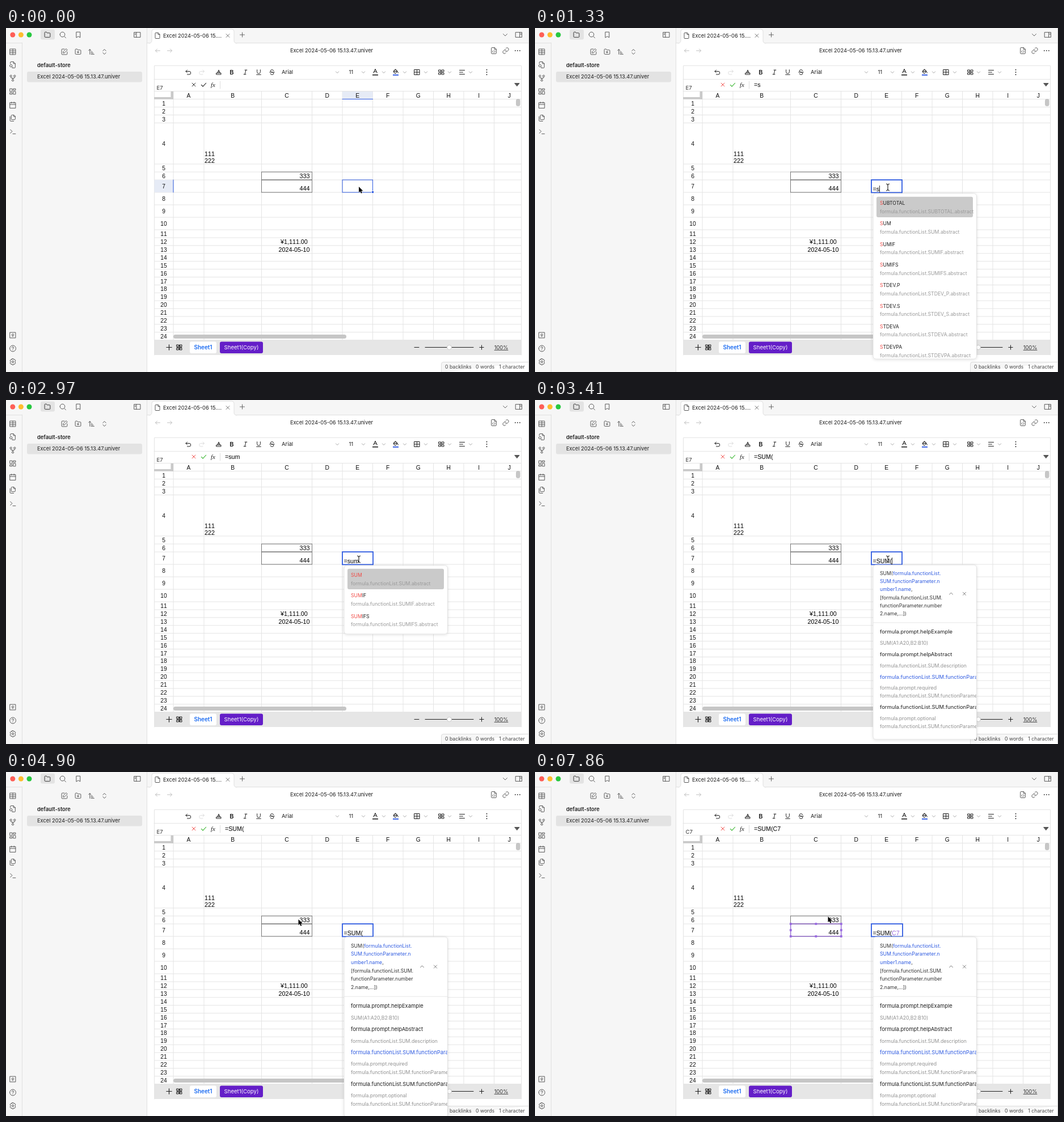
These frames come from a looping animation (922x607 px, 8000 ms). An HTML page:

```html
<!DOCTYPE html>
<html lang="en">
<head>
<meta charset="utf-8">
<title>Spreadsheet formula entry</title>
<style>
html, body { margin: 0; width: 100%; height: 100%; overflow: hidden; background: #fff; }
svg { display: block; }
text { font-family: Inter, "Open Sans", sans-serif; white-space: pre; }
.cell { font-family: "Liberation Sans", Arial, sans-serif; font-kerning: none; }
.icon { fill: none; stroke-linecap: round; stroke-linejoin: round; }
</style>
</head>
<body>
<svg id="stage" width="922" height="607" viewBox="0 0 922 607">
  <defs>
    <clipPath id="panelClip"><rect x="596" y="290" width="182" height="330"/></clipPath>
    <clipPath id="gridClip"><rect x="261" y="111" width="647" height="439"/></clipPath>
    <filter id="soft" x="-10%" y="-10%" width="120%" height="120%">
      <feDropShadow dx="0" dy="1" stdDeviation="2.5" flood-opacity=".13"/>
    </filter>
  </defs>
  <g id="base"></g>
  <g id="live"></g>
</svg>
<script>
const LOOP = 8000, BLUE = '#2f5be0', PURPLE = '#9a6be0', INK = '#1f1f1f', LINE = '#e4e4e4';
const $ = id => document.getElementById(id);

// ---- drawing helpers; y of a text is the middle of its capitals
const text = (x, y, s, size = 9.3, fill = INK, more = '') =>
  `<text x="${x}" y="${y + size * .36}" font-size="${size}" fill="${fill}" ${more}>${s}</text>`;
const cell = (x, y, s, size = 10.75, fill = '#000', more = '') =>
  text(x, y, s, size, fill, 'class="cell" ' + more);
const rect = (x, y, w, h, fill, more = '') =>
  `<rect x="${x}" y="${y}" width="${w}" height="${h}" fill="${fill}" ${more}/>`;
const frame = (x, y, w, h, color, width = 1, fill = 'none') =>
  rect(x, y, w, h, fill, `stroke="${color}" stroke-width="${width}"`);
const path = (d, color = INK, width = 1, more = '') =>
  `<path class="icon" d="${d}" stroke="${color}" stroke-width="${width}" ${more}/>`;
// icon on a 24 unit grid, centred on x, y
const icon = (x, y, d, color = '#555', size = 13, width = 1.8) =>
  `<g transform="translate(${x - size / 2} ${y - size / 2}) scale(${size / 24})">${path(d, color, width)}</g>`;
const MID = 'text-anchor="middle"', END = 'text-anchor="end"';

const X = 'M5 5L19 19M19 5L5 19', PLUS = 'M12 4V20M4 12H20', DOWN = 'M5 9L12 16L19 9';
const UNDO = 'M8 4L3 9L8 14M3 9H15A5.5 5.5 0 0 1 15 20H8';
const FILE = 'M14 2H6A2 2 0 0 0 4 4V20A2 2 0 0 0 6 22H18A2 2 0 0 0 20 20V8ZM14 2V8H20';
const FOLDER = 'M3 5A2 2 0 0 1 5 3H9L11 6H19A2 2 0 0 1 21 8V18A2 2 0 0 1 19 20H5A2 2 0 0 1 3 18Z';
const box = (x, y, w, h) => `M${x} ${y}h${w}v${h}h${-w}Z`;
const ring = (x, y, r) => `M${x - r} ${y}a${r} ${r} 0 1 0 ${2 * r} 0a${r} ${r} 0 1 0 ${-2 * r} 0`;

// ---- sheet geometry
const cols = [295, 349, 450.5, 539.5, 593, 646.5, 700, 753.5, 807, 860.5, 914];
const rows = [125.5, 139.5, 153.5, 167.5, 240, 254, 268, 290, 312, 334, 356, 370];
while (rows.length < 25) rows.push(rows[rows.length - 1] + 13.9);

function chrome() {
  let s = rect(0, 0, 922, 607, '#fff') + rect(0, 0, 248, 607, '#f6f6f6') + rect(248, 0, 674, 26, '#f6f6f6');
  s += path('M28.5 26V607M0 26.5H28M248.5 0V607M248 26.5H922', '#e0e0e0');
  s += path('M252 27Q257 27 257 22V6Q257 2 261 2H398Q402 2 402 6V22Q402 27 407 27', '#e0e0e0', 1, 'style="fill:#fff"');
  s += path('M921.5 0V607', '#d4d4d4');
  ['#fe5f57', '#febc2e', '#28c840'].forEach((c, i) =>
    s += `<circle cx="${11.8 + i * 14.6}" cy="12" r="4.5" fill="${c}"/>`);
  s += rect(61, 2.5, 25, 18, '#e3e3e3', 'rx="3"');
  s += icon(73, 12, FOLDER, '#333') + icon(100, 12, ring(11, 11, 8) + 'M17 17L22 22');
  s += icon(127.5, 12, 'M6 3H18V21L12 17L6 21Z');
  s += icon(231.5, 12, box(2, 4, 20, 16) + 'M9 4V20M4.5 8H6M4.5 11H6') + icon(904, 12, box(2, 4, 20, 16) + 'M15 4V20M18 8H19.5M18 11H19.5');
  s += icon(267, 13.5, FILE, '#444', 12) + text(277, 13.5, 'Excel 2024-05-06 15....');
  s += icon(391, 13.5, X, '#444', 10) + icon(416.5, 12, PLUS, '#555', 12) + icon(880, 12, DOWN, '#555', 12);

  // left strip
  const strip = [
    [42, box(3, 3, 18, 18) + 'M3 9H21M3 15H21M12 3V21'],
    [65, 'M4 8V4A2 2 0 0 1 6 2H14L20 8V20A2 2 0 0 1 18 22H10M14 2V8H20M9 18L11 20' + ring(6, 15, 4)],
    [88.5, ring(12, 19, 3) + ring(6, 5, 3) + ring(18, 5, 3) + 'M6 8V10Q6 12 8 12H16Q18 12 18 10V8M12 12V16'],
    [112, box(3, 3, 7, 9) + box(14, 3, 7, 5) + box(14, 12, 7, 9) + box(3, 16, 7, 5)],
    [136, box(3, 4, 18, 18) + 'M8 2V6M16 2V6M3 10H21'],
    [159, 'M15 2H9A2 2 0 0 0 7 4V15A2 2 0 0 0 9 17H18A2 2 0 0 0 20 15V7ZM15 2V7H20M3 7V20A2 2 0 0 0 5 22H15'],
    [183, 'M4 17L10 11L4 5M12 19H21'],
    [542, box(3, 3, 18, 18) + ring(12, 11, 3) + 'M12 14V17'],
    [565.5, ring(12, 12, 10) + 'M9 9Q9.5 6.5 12 6.5T15 9.3Q15 11 12 13V14M12 17.5V17.6'],
    [589, ring(12, 12, 3) + 'M10 2H14L15 5L18 4L21 8L19.5 10.5V13.5L21 16L18 20L15 19L14 22H10L9 19L6 20L3 16L4.5 13.5V10.5L3 8L6 4L9 5Z']
  ];
  strip.forEach(([y, d]) => s += icon(12, y, d));

  // file list
  s += icon(103, 42, 'M12 3H5A2 2 0 0 0 3 5V19A2 2 0 0 0 5 21H19A2 2 0 0 0 21 19V12M18 2.5L21.5 6L12 15.5L8 16L8.5 12Z');
  s += icon(127, 42, FOLDER + 'M12 10V16M9 13H15') + icon(150.5, 42, 'M3 8L7 4L11 8M7 4V20M11 12H15M11 16H18M11 20H21');
  s += icon(173.5, 42, 'M7 15L12 20L17 15M7 9L12 4L17 9');
  s += text(55, 66, 'default-store', 9.3, INK, 'font-weight="600"');
  s += rect(37, 77, 203, 18.5, '#e3e3e3', 'rx="3"') + text(55, 86, 'Excel 2024-05-06 15.13.47.univer');

  // note header
  s += icon(267.5, 40, 'M20 12H4M10 6L4 12L10 18', '#b8b8b8', 12) + icon(288.5, 40, 'M4 12H20M14 6L20 12L14 18', '#b8b8b8', 12);
  s += text(574, 40, 'Excel 2024-05-06 15.13.47.univer', 9.3, INK, MID);
  s += icon(860, 40, FILE + 'M10 12L8 15L10 18M14 12L16 15L14 18');
  s += icon(881, 40, 'M10 13A5 5 0 0 0 17.5 13.5L20.5 10.5A5 5 0 0 0 13.5 3.5L12 5M14 11A5 5 0 0 0 6.5 10.5L3.5 13.5A5 5 0 0 0 10.5 20.5L12 19');
  [897.8, 901.8, 905.8].forEach(x => s += `<circle cx="${x}" cy="40" r="1" fill="#444"/>`);
  return s;
}

function toolbar() {
  let s = path('M261.5 577V66.5H908.5V577M261 90.5H908M261 111.5H908', LINE);
  s += icon(345, 78, 'M16 4L21 9L16 14M21 9H9A5.5 5.5 0 0 0 9 20H16', '#dedede', 12, 2);
  s += icon(375, 78, 'M4 15H20V20H4ZM7 15L12 4L17 15M9 11H15', INK, 12, 2);
  s += text(398, 78, 'B', 11, INK, MID + ' font-weight="600"');
  s += icon(422, 78, 'M10 4H18M6 20H14M14 4L10 20', INK, 11.5, 2);
  s += icon(445.5, 78, 'M6 3V11A6 6 0 0 0 18 11V3M4 21H20', INK, 11.5, 2);
  s += icon(469, 78, 'M18 7Q17 3 12 3Q6 3 6 8Q6 11 12 12Q18 13 18 16.5Q18 21 12 21Q6.5 21 6 17M3 12H21', INK, 11.5, 2);
  s += text(486, 78, 'Arial', 9.5) + text(604.5, 78, '11', 9.5);
  [584, 630, 666, 703, 740, 782, 819].forEach(x => s += icon(x, 78, DOWN, '#888', 9, 2));
  s += icon(651, 77, 'M5 17L12 2L19 17M8 12H16', INK, 11, 2.2) + rect(646, 82, 10, 1.6, INK);
  s += icon(687, 77, 'M4 10L11 3L19 11L12 18Q10 19 8 17L4 13ZM5 11H18M21 14V17', INK, 11, 2.2) + rect(682, 82, 10, 1.8, '#2854e0');
  s += icon(724.5, 78, box(3, 3, 18, 18) + 'M3 12H21M12 3V21', INK, 12, 2);
  s += icon(767.5, 78, box(3, 4, 7, 6) + box(14, 4, 7, 6) + box(3, 14, 7, 6) + box(14, 14, 7, 6) + 'M10 12H14', INK, 12, 2);
  s += icon(804, 78, 'M3 5H21M3 12H15M3 19H21', INK, 12, 2.2);
  [73.8, 78, 82.2].forEach(y => s += `<circle cx="847.5" cy="${y}" r=".95" fill="#222"/>`);
  s += path('M377.5 94V107', '#ddd') + path('M897 97.5H905L901 102.5Z', '#555', 1, 'style="fill:#555"');
  s += `<text x="361" y="103.6" font-size="11" font-style="italic" font-weight="500" fill="${INK}" style="font-family:'Liberation Serif',serif">fx</text>`;
  return s;
}

function sheet() {
  let s = '';
  cols.forEach(x => s += path(`M${x} 111V550`, LINE));
  rows.forEach(y => s += path(`M261 ${y}H908`, LINE));
  s += rect(261, 122, 34, 3.5, '#c9c9c9') + rect(290.5, 112, 4.5, 13.5, '#c9c9c9');
  s += frame(450.5, 254, 89, 14, '#777') + frame(450.5, 268, 89, 22, '#777');
  s += cell(350, 222, '111') + cell(350, 234, '222');
  s += cell(535.5, 261.5, '333', 10.75, '#000', END) + cell(535.5, 283.5, '444', 10.75, '#000', END);
  s += cell(484, 377.5, '¥1,111.00') + cell(535.5, 391.5, '2024-05-10', 10.75, '#000', END);
  return `<g clip-path="url(#gridClip)">${s}</g>`;
}

function headers(active) {
  let s = '';
  if (active) {
    s += rect(593, 112, 53.5, 13.5, '#e6ebf6') + path('M593 125.5H646.5', BLUE);
    s += rect(261.5, 268, 33.5, 22, '#e6ebf6') + path('M295 268V290', BLUE);
  }
  [...'ABCDEFGHIJ'].forEach((c, i) =>
    s += cell((cols[i] + cols[i + 1]) / 2, 119, c, 10.3, '#111', MID));
  for (let i = 0; i < 24; i++)
    s += cell(278, (rows[i] + rows[i + 1]) / 2 + .4, i + 1, 10.3, '#111', MID);
  return s;
}

function footer() {
  let s = rect(295, 541, 305, 7, '#c6c6c6', 'rx="3.5"') + rect(899, 125, 7.5, 13, '#c6c6c6', 'rx="3.5"');
  s += rect(261, 550, 647, 27, '#e6e6e6');
  s += icon(287.5, 563.5, PLUS, INK, 14, 2);
  s += icon(305.5, 563.5, box(3, 3, 6, 6) + box(15, 3, 6, 6) + box(3, 15, 6, 6) + box(15, 15, 6, 6) + 'M12 3V21M3 12H21', INK, 12, 2);
  s += rect(324, 553.5, 47, 20.5, '#fff', 'rx="3"') + text(347.5, 563.5, 'Sheet1', 10, '#1c6cf2', MID + ' font-weight="600"');
  s += rect(377, 553.5, 76, 20.5, '#641ec8', 'rx="3"') + text(415, 563.5, 'Sheet1(Copy)', 9.6, '#fff', MID);
  s += path('M720 563.5H728M739 563.5H824', INK) + icon(838.5, 563.5, PLUS, INK, 11, 2.2);
  s += '<circle cx="781.5" cy="563.5" r="4" fill="#fff" stroke="#bbb" stroke-width=".8"/>';
  s += text(873, 563.5, '100%', 9.3, '#333', MID + ' text-decoration="underline"');
  s += path('M767.5 608V593Q767.5 589.5 771 589.5H922', '#dcdcdc', 1, 'style="fill:#f6f6f6"');
  s += text(774, 598, '0 backlinks', 8.7, '#444') + text(828, 598, '0 words', 8.7, '#444') + text(914.5, 598, '1 character', 8.7, '#444', END);
  return s;
}

const card = h => rect(596, 0, 182.5, h, '#fff', 'rx="5" stroke="#dcdcdc" stroke-width=".8" filter="url(#soft)"');

const FUNCS = ['SUBTOTAL', 'SUM', 'SUMIF', 'SUMIFS', 'STDEV.P', 'STDEV.S', 'STDEVA', 'STDEVPA'];
function suggestions(prefix) {
  const hits = FUNCS.filter(f => f.startsWith(prefix)), n = prefix.length;
  let s = `<g transform="translate(0 292)">${card(Math.min(12 + 36.3 * hits.length, 292))}</g>`;
  s += rect(602, 297.8, 170, 36.2, '#cacaca', 'rx="3"');
  hits.forEach((f, i) => {
    const y = 309 + 36.3 * i;
    s += text(608, y, `<tspan fill="#f04a45">${f.slice(0, n)}</tspan>${f.slice(n)}`, 8.6);
    s += text(608, y + 14.5, `formula.functionList.${f.replace('.', '_')}.abstract`, 8.7, '#999');
  });
  return s;
}

function help(scale) {
  const fn = 'formula.functionList.SUM.', blue = s => `<tspan fill="${BLUE}">${s}</tspan>`;
  const head = ['SUM(' + blue('formula.functionList.'), blue('SUM.functionParameter.n'),
    blue('umber1.name') + ',', '[' + fn, 'functionParameter.number', '2.name,...])'];
  const body = [
    [413, 'formula.prompt.helpExample', INK], [433.5, 'SUM(A1:A20,B2:B10)'],
    [454, 'formula.prompt.helpAbstract', INK], [474.5, fn + 'description'],
    [494.8, fn + 'functionParameter.number1.name', BLUE],
    [515.3, 'formula.prompt.required'], [530, fn + 'functionParameter.number1.detail'],
    [550.5, fn + 'functionParameter.number2.name', INK],
    [571, 'formula.prompt.optional'], [585.7, fn + 'functionParameter.number2.detail']
  ];
  let s = '';
  head.forEach((l, i) => s += text(608, 306.5 + 14.65 * i, l, 8.7, '#333'));
  body.forEach(([y, l, c]) => s += text(608, y, l, c ? 9.4 : 8.7, c || '#909090'));
  s += path('M596 396.2H778', '#e6e6e6');
  s += icon(733.5, 343.5, 'M5 15L12 8L19 15', '#555', 10, 2) + icon(757, 343.5, X, '#555', 9, 2);
  return `<g transform="translate(0 291) scale(1 ${scale})">${card(318)}` +
    `<g transform="translate(0 -291)" clip-path="url(#panelClip)">${s}</g></g>`;
}

function pointer({ x, y, beam }) {
  if (beam) {
    const d = `M${x - 2.5} ${y - 6}Q${x} ${y - 6} ${x} ${y - 4}V${y + 4}Q${x} ${y + 6} ${x - 2.5} ${y + 6}M${x + 2.5} ${y - 6}Q${x} ${y - 6} ${x} ${y - 4}M${x} ${y + 4}Q${x} ${y + 6} ${x + 2.5} ${y + 6}`;
    return path(d, '#fff', 2) + path(d, '#000', 1);
  }
  return `<path transform="translate(${x} ${y})" d="M0 0V10.2L2.3 8L4 11.8L5.8 11L4.2 7.4H7.4Z" fill="#000" stroke="#fff" stroke-width=".9" paint-order="stroke"/>`;
}

function marks(ref) {
  const r = ref.slice(1) - 1, [x, w, y, h] = [450.8, 89, rows[r], rows[r + 1] - rows[r]];
  let s = frame(x, y, w, h, PURPLE, 1.2);
  for (let i = 0; i < 3; i++) for (let j = 0; j < 3; j++)
    if (i !== 1 || j !== 1) s += rect(x + w * i / 2 - 1.9, y + h * j / 2 - 1.9, 3.8, 3.8, PURPLE);
  return s;
}

// ---- state over time; each entry changes part of the state
const steps = [
  [0, { name: 'E7', txt: '', ref: '', undo: 1, x: 622, y: 280 }],
  [440, { edit: 1, caret: 1, beam: 1, y: 281 }],
  [590, { undo: 0 }],
  [880, { txt: '=' }],
  [1030, { undo: 1 }],
  [1330, { txt: '=s' }],
  [1780, { caret: 0 }],
  [2230, { txt: '=su', caret: 1 }],
  [2370, { txt: '=sum' }],
  [2970, { caret: 0 }],
  [3410, { txt: '=SUM(', caret: 1, panel: .968 }],
  [3560, { panel: 1 }],
  [3860, { caret: 0 }],
  [4160, { beam: 0, x: 610, y: 276 }],
  [4310, { caret: 1, x: 588, y: 272 }],
  [4460, { x: 559, y: 267 }],
  [4600, { x: 534, y: 263 }],
  [4750, { caret: 0, x: 520, y: 261 }],
  [4900, { x: 515.5, y: 260 }],
  [5040, { name: 'C6', ref: 'C6', caret: 1 }],
  [5340, { x: 516.5, y: 267 }],
  [5490, { x: 518, y: 277 }],
  [5630, { x: 518.5, y: 282, caret: 0 }],
  [6070, { caret: 1 }],
  [6520, { caret: 0 }],
  [6970, { caret: 1 }],
  [7110, { name: 'C7', ref: 'C7' }],
  [7260, { x: 518.5, y: 283 }],
  [7410, { x: 518, y: 282 }],
  [7710, { x: 517.5, y: 271 }],
  [7860, { x: 516.5, y: 255, caret: 0 }]
];

const pen = document.createElement('canvas').getContext('2d');
pen.font = '10.7px "Liberation Sans", Arial, sans-serif';
pen.fontKerning = 'none';

function scene(s) {
  const full = s.txt + s.ref;
  let out = headers(!s.edit) + icon(321.5, 78, UNDO, s.undo ? INK : '#dedede', 12, 2);
  out += text(265.5, 106, s.name, 9.5, '#333');
  out += icon(331, 100, X, s.edit ? '#f0403c' : INK, 10, 2.2);
  out += icon(348.5, 100, 'M3 13L9 19L21 6', s.edit ? '#35b52c' : INK, 11, 2.4);
  out += cell(386, 100, full, 10.7);
  if (s.ref) out += marks(s.ref);
  if (!s.edit) {
    out += frame(593, 268, 53.5, 22, BLUE) + rect(644.6, 287.6, 4, 4, BLUE, 'stroke="#fff" stroke-width=".8"');
  } else {
    out += frame(593, 268, s.ref ? 55 : 54, 22.4, BLUE, 1.8, '#fff');
    out += cell(595.5, 284.5, `${s.txt}<tspan fill="${PURPLE}">${s.ref}</tspan>`, 10.7);
    if (s.caret) out += rect(Math.round(595.5 + pen.measureText(full).width - .4), 278, 1, 12.5, '#333');
  }
  const typed = /^=([a-z]+)$/.exec(s.txt);
  if (typed) out += suggestions(typed[1].toUpperCase());
  if (s.panel) out += help(s.panel);
  return out + pointer(s);
}

$('base').innerHTML = chrome() + toolbar() + sheet() + footer();

let shown = -1;
const start = performance.now();
function tick() {
  const t = (performance.now() - start) % LOOP;
  const count = steps.filter(([at]) => at <= t).length;
  if (count !== shown) {
    shown = count;
    $('live').innerHTML = scene(Object.assign({}, ...steps.slice(0, count).map(e => e[1])));
  }
  requestAnimationFrame(tick);
}
tick();
</script>
</body>
</html>
```
